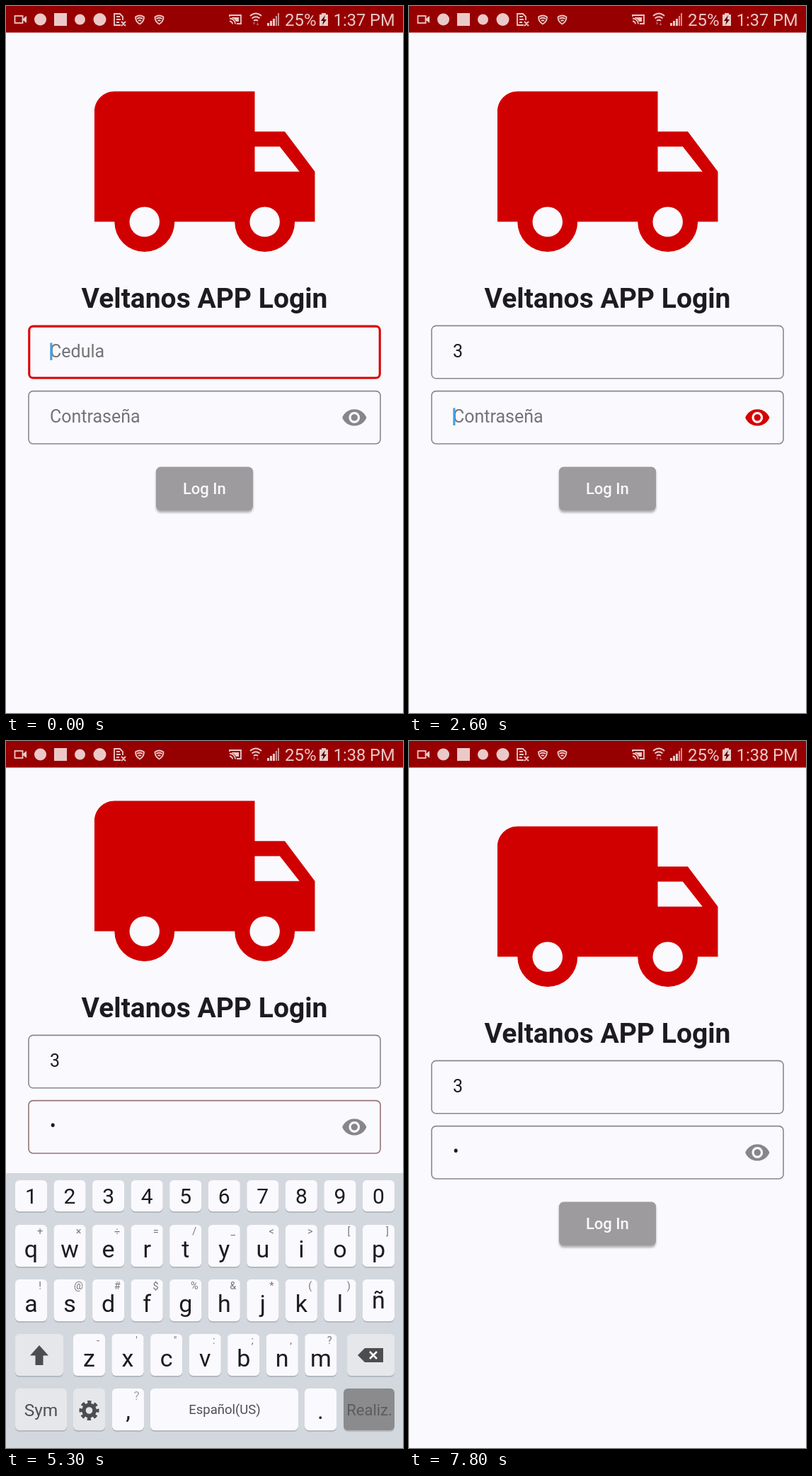
Write an HTML page that moves like this. It is 561 by 998 pixels and loops after 8000 ms.

```html
<!DOCTYPE html>
<html lang="es">
<head>
<meta charset="utf-8">
<title>Login</title>
<style>
  html, body { margin: 0; width: 100%; height: 100%; overflow: hidden; background: #faf9fd; }
  svg { display: block; width: 100vw; height: 100vh; }
  text { font-family: Roboto, sans-serif; white-space: pre; }
  .mid { text-anchor: middle; }
  .input { font-size: 25px; fill: #1d1b20; }
  .hint { font-size: 25px; fill: #757378; }
  .letter { font-size: 34px; fill: #1c1b1f; }
  .digit { font-size: 30px; fill: #1c1b1f; }
  .alt { font-size: 14.5px; fill: #77777b; }
  .key { fill: #faf9fd; }
  .fn { fill: #e5e7ea; }
  .line { fill: none; stroke: #ecc9c9; stroke-width: 1.8; }
</style>
</head>
<body>
<svg viewBox="0 0 561 998">
  <defs>
    <clipPath id="viewport"><rect id="clip" y="78" width="561" height="920"/></clipPath>
    <filter id="drop" x="-10%" y="-20%" width="120%" height="150%">
      <feDropShadow dx="0" dy="2.5" stdDeviation="1.8" flood-color="#000" flood-opacity=".32"/>
    </filter>
    <g id="gear" fill="none" stroke="#4d4d50">
      <circle r="7.6" stroke-width="5.6"/>
      <circle r="11.5" stroke-width="5" stroke-dasharray="5 4.03" stroke-dashoffset="2.5"/>
    </g>
    <g id="shield">
      <path class="line" d="M-6 -3.5Q0 -7.5 6 -3.5Q6 3 0 6.5Q-6 3 -6 -3.5z" stroke-width="1.5"/>
      <path class="line" d="M-4 -1Q0 -3.5 4 -1M-2 2Q0 .5 2 2"/>
    </g>
  </defs>

  <rect width="561" height="998" fill="#faf9fd"/>

  <g clip-path="url(#viewport)">
    <g id="form">
      <path transform="translate(110.8 63.9) scale(14.16)" fill="#d10000" fill-rule="evenodd"
        d="M20 8h-3V4H3c-1.1 0-2 .9-2 2v11h2a3 3 0 0 0 6 0h6a3 3 0 0 0 6 0h2v-5zM6 18.5a1.5 1.5 0 1 1 0-3 1.5 1.5 0 0 1 0 3zM18 18.5a1.5 1.5 0 1 1 0-3 1.5 1.5 0 0 1 0 3zM19.5 9.5l1.96 2.5H17V9.5z"/>
      <text class="mid" x="280.5" y="426" font-size="39" font-weight="700" fill="#1d1b20">Veltanos APP Login</text>

      <rect id="idBox" fill="none"/>
      <text id="idText" x="62" y="496"></text>
      <rect id="passBox" fill="none"/>
      <text id="passText" x="62" y="588"></text>
      <rect id="caret" x="62.3" width="3.1" height="24.5" fill="#45a0e0"/>
      <path id="eye" transform="translate(473.6 562.2) scale(1.558)"
        d="M12 4.5C7 4.5 2.73 7.61 1 12c1.73 4.39 6 7.5 11 7.5s9.27-3.11 11-7.5c-1.73-4.39-6-7.5-11-7.5zM12 17c-2.76 0-5-2.24-5-5s2.24-5 5-5 5 2.24 5 5-2.24 5-5 5zm0-8c-1.66 0-3 1.34-3 3s1.34 3 3 3 3-1.34 3-3-1.34-3-3-3z"/>

      <rect id="button" x="212" y="650.5" width="137" height="62" rx="6.5" filter="url(#drop)"/>
      <text class="mid" x="280.3" y="689" font-size="22" font-weight="500" fill="#fbf9fc">Log In</text>
    </g>
  </g>

  <g id="keyboard">
    <rect y="608" width="561" height="520" fill="#d3d8df"/>
    <g id="keys"></g>
  </g>

  <rect width="561" height="37.5" fill="#970000"/>
  <g fill="#ecc9c9">
    <rect class="line" x="12.5" y="14" width="11" height="10"/>
    <path d="M24 18l5-4v10l-5-4z"/>
    <circle cx="48.5" cy="19" r="8.5"/>
    <rect x="68" y="10" width="18" height="18"/>
    <circle cx="104.5" cy="19" r="7.5"/>
    <circle cx="132.5" cy="19" r="9"/>
    <path class="line" d="M162 27H153V11H161L165 15V20M156 15h5M156 19h6M156 23h4M163 22l6 6m0-6l-6 6"/>
    <use href="#shield" x="189" y="19"/>
    <use href="#shield" x="216.5" y="19"/>
    <path class="line" d="M316 15V13H332V25H326M316 17.5a8 8 0 0 1 8 8M316 21.5a4 4 0 0 1 4 4"/>
    <path d="M319 16h10v6h-4a9 9 0 0 0-6-5z"/>
    <path class="line" d="M345 14Q353 7 361 14M347.5 17.5Q353 13 358.5 17.5M350 21Q353 18.5 356 21"/>
    <path d="M349 23h3l-1.500 4zM354 27h3l-1.500-4z" opacity=".5"/>
    <path d="M369 28v-4h3v4zM373 28v-7h3v7zM377 28v-10h3v10z"/>
    <path d="M381 28v-14h2v14zM384 28v-18h2v18z" opacity=".7"/>
    <path d="M446 10h6v2h3v16h-12V12h3z"/>
    <path d="M451 13l-6 8h3.500l-1.500 6 6-8h-3.500z" fill="#500000"/>
    <text x="394" y="27.500" font-size="24">25%</text>
    <text id="clock" x="549.500" y="27.500" font-size="23.600" text-anchor="end"></text>
  </g>
</svg>

<script>
const $ = id => document.getElementById(id);
const LOOP = 8000, STEP = 100, PITCH = 54.55;

/* ---------- keyboard ---------- */
const keyRect = (x, y, w, h, cls = 'key', id = '') =>
  `<rect x="${x}" y="${y + 2}" width="${w}" height="${h}" rx="6" fill="#b4b9c1"/>
   <rect ${id && `id="${id}"`} class="${cls}" x="${x}" y="${y}" width="${w}" height="${h}" rx="6"/>`;
const label = (x, y, cls, s, extra = '') =>
  `<text class="mid ${cls}" x="${x}" y="${y}" ${extra}>${s.replace('<', '&lt;').replace('&', s === '&' ? '&amp;' : '&')}</text>`;

function letterRow(left, top, letters, alts) {
  return [...letters].map((c, i) => {
    const x = left + PITCH * i;
    return keyRect(x, top, 45, 59) +
      label(x + 22.5, top + (c === 'ñ' ? 41 : 45.5), 'letter', c) +
      label(x + 35, top + 14, 'alt', alts[i] || '');
  }).join('');
}

const digits = [...'1234567890'].map((c, i) => {
  const x = 13 + PITCH * i;
  return keyRect(x, 618, 45, 44, 'key', 'digit' + c) + label(x + 22.5, 651, 'digit', c);
}).join('');

$('keys').innerHTML = digits +
  letterRow(13, 681, 'qwertyuiop', '+×÷=/_<>[]') +
  letterRow(13, 758, 'asdfghjklñ', '!@#$%&*()') +
  letterRow(95, 835, 'zxcvbnm', '-\'":;,?') +
  keyRect(13, 835, 68, 59, 'fn') +
  '<path fill="#4d4d50" d="M47 851L60 865.500H52.500V879H41.500V865.500H34z"/>' +
  keyRect(482, 835, 67, 59, 'fn') +
  '<path fill="#4d4d50" d="M497 865L507 855H533V875H507z"/>' +
  '<path stroke="#fff" stroke-width="2.500" d="M514 860l10 10m0-10l-10 10"/>' +
  keyRect(13, 912, 73, 59, 'fn') + label(49.5, 950.5, '', 'Sym', 'font-size="24.500" fill="#505054"') +
  keyRect(95, 912, 45, 59, 'fn') +
  `<g id="mic">
     <rect x="112.500" y="928" width="10" height="19" rx="5" fill="#4d4d50"/>
     <path d="M108.500 940a9 9 0 0 0 18 0M117.500 949v7" fill="none" stroke="#4d4d50" stroke-width="2.500"/>
     <use href="#gear" transform="translate(130.500 923) scale(.45)" opacity=".5"/>
   </g>
   <use id="bigGear" href="#gear" x="117.500" y="943"/>` +
  keyRect(150, 912, 45, 59) + label(172.5, 955, 'letter', ',') +
  label(184.5, 928, '', '?', 'font-size="17" fill="#a5a5a9"') +
  keyRect(204, 912, 209, 59) + label(309, 948, '', 'Español(US)', 'font-size="18.500" fill="#505054"') +
  keyRect(422, 912, 45, 59) + label(444.5, 955, 'letter', '.') +
  keyRect(477, 912, 72, 59, 'fn', 'done') + label(513.5, 950, '', 'Realiz.', 'font-size="22" fill="#5c5c60"');

/* ---------- timeline ---------- */
// Linear interpolation through [time, value] steps.
function track(t, steps) {
  const i = steps.findIndex(s => s[0] > t);
  if (i === 0) return steps[0][1];
  if (i < 0) return steps[steps.length - 1][1];
  const [t0, a] = steps[i - 1], [t1, b] = steps[i];
  return a + (b - a) * (t - t0) / (t1 - t0);
}
const within = (t, ...spans) => spans.some(([a, b]) => t >= a && t < b);

const enter = t => [[t, 120], [t + 200, 34], [t + 300, 0]];
const leave = t => [[t, 0], [t + 100, 2], [t + 200, 50], [t + 300, 110], [t + 400, 120]];
const fadeIn = t => [[t, 0], [t + 200, .65], [t + 300, 1]];
const fadeOut = t => [[t + 100, 1], [t + 200, .6], [t + 300, .15], [t + 400, 0]];

const slide = [...enter(200), ...leave(1700), ...enter(2900), ...leave(5200)];
const fade = [...fadeIn(200), ...fadeOut(1700), ...fadeIn(2900), ...fadeOut(5200)];
const scroll = [[2900, 0], [3000, -26], [3100, -43.5], [5200, -43.5], [5300, -36], [5400, -12], [5500, 0]];
const idFocus = [[1700, 1], [1800, .15], [1900, 0]];
const passFocus = [[2600, 0], [2800, 1], [5200, 1], [5300, .15], [5400, 0]];
const press = [[5900, 0], [6100, 1], [6200, 1], [6500, 0]];

const mix = (a, b, k) => `rgb(${a.map((v, i) => Math.round(v + (b[i] - v) * k))})`;

function drawBox(el, top, focus) {
  const wide = focus > .3 ? 3.1 : 1.6, inset = wide / 2;
  const attrs = {
    x: 31.2 + inset, y: top + inset, width: 498.6 - wide, height: 76 - wide, rx: 7 - inset,
    stroke: mix([138, 136, 141], [218, 0, 0], focus), 'stroke-width': wide
  };
  for (const k in attrs) el.setAttribute(k, attrs[k]);
}

function setInput(el, value, hint) {
  el.textContent = value || hint;
  el.setAttribute('class', value ? 'input' : 'hint');
}

const show = (el, on) => el.setAttribute('visibility', on ? 'inherit' : 'hidden');

function render(t) {
  const alpha = track(t, fade);
  $('keyboard').setAttribute('transform', `translate(0 ${track(t, slide)})`);
  $('keyboard').setAttribute('opacity', alpha);
  show($('keyboard'), alpha > 0);
  $('done').style.fill = within(t, [1700, 2200], [5200, 5700]) ? '#8b8b8d' : '';
  $('digit3').style.fill = within(t, [1100, 1300], [4400, 4600]) ? '#c6cad0' : '';
  show($('mic'), t < 2500);
  show($('bigGear'), t >= 2500);

  $('form').setAttribute('transform', `translate(0 ${track(t, scroll)})`);
  $('clip').setAttribute('height', within(t, [300, 1800], [3000, 5400]) ? 530 : 920);
  drawBox($('idBox'), 450.6, track(t, idFocus));
  drawBox($('passBox'), 542.8, track(t, passFocus));
  setInput($('idText'), t >= 1200 ? '3' : '', 'Cedula');
  setInput($('passText'), t >= 4500 ? '•' : '', 'Contraseña');
  $('eye').setAttribute('fill', within(t, [2600, 5200]) ? '#d60000' : '#88868a');

  const onPass = t >= 2600, typed = within(t, [1200, 1700], [4500, 5000]);
  show($('caret'), typed || within(t, [0, 400], [900, 1200], [2600, 3100], [3600, 4100]));
  $('caret').setAttribute('x', typed ? (onPass ? 70.5 : 76.2) : 62.3);
  $('caret').setAttribute('y', onPass ? 567.5 : 475.5);

  $('button').setAttribute('fill', mix([158, 155, 159], [150, 147, 151], track(t, press)));
  $('clock').textContent = t < 2700 ? '1:37 PM' : '1:38 PM';
}

const start = performance.now();
function tick() {
  const t = (performance.now() - start) % LOOP;
  render(Math.floor(t / STEP) * STEP);
  requestAnimationFrame(tick);
}
tick();
</script>
</body>
</html>
```
